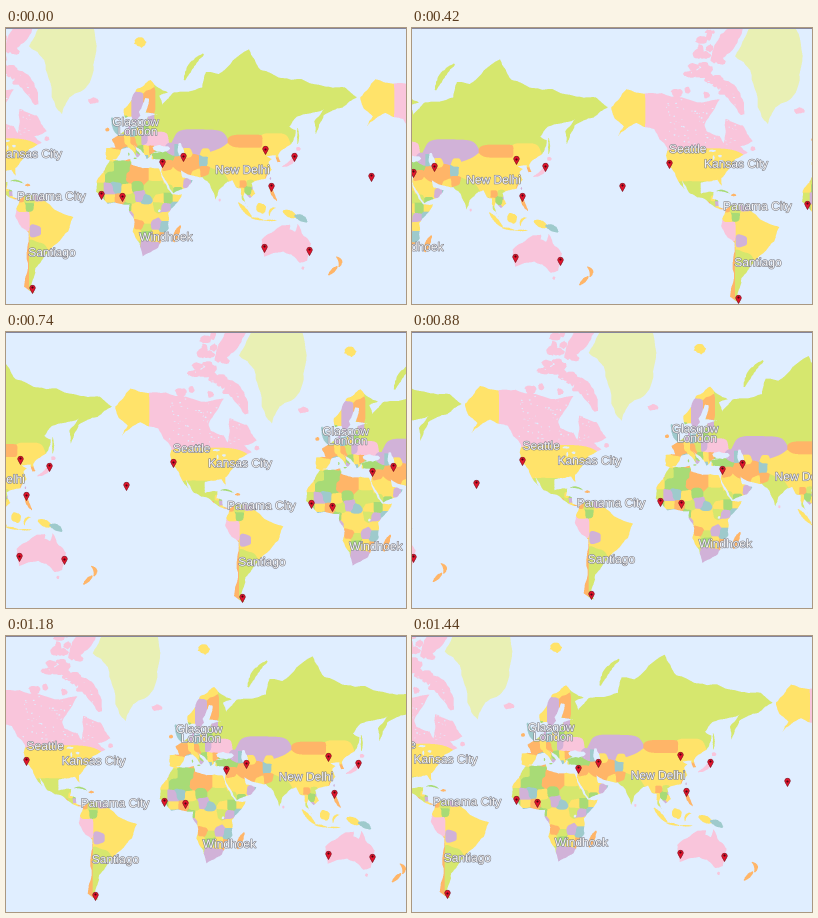
Write a matplotlib script that moves like this. It is 400 px wide and 276 px high and loops after 1460 ms.

```python
import math
import random

import numpy as np
import matplotlib.pyplot as plt
from matplotlib import patheffects
from matplotlib.animation import FuncAnimation
from matplotlib.path import Path

random.seed(4)

WIDTH, HEIGHT = 400, 276
FRAMES, INTERVAL = 73, 20
WORLD = 455                      # width of one whole turn of the map
RADIUS = WORLD / (2 * math.pi)
EQUATOR, WEST, TOP, ROWS = 181.5, -170, -14, 300
LEFT = 111.6 + WEST * WORLD / 360
SS = 3                           # supersampling of the map

COLOURS = {
    "ocean": (224, 238, 255), "lime": (214, 231, 110), "yellow": (255, 227, 106),
    "orange": (255, 181, 104), "pink": (249, 197, 219), "purple": (209, 178, 216),
    "teal": (158, 202, 204), "green": (168, 219, 118), "pale": (233, 240, 180),
    "rim": (133, 133, 154),
}
PATCHES = ["yellow", "purple", "orange", "green", "teal", "lime", "yellow"]


def project(lon, lat):
    """Mercator position in stage pixels, x counted from the map's west edge."""
    lat = np.radians(lat)
    x = (np.asarray(lon) - WEST) * WORLD / 360
    return x, EQUATOR - RADIUS * np.log(np.tan(math.pi / 4 + lat / 2))


def roughen(pts, rounds, amount=0.08):
    """Split every edge and push the new point a little sideways."""
    for _ in range(rounds):
        out = []
        for a, b in zip(pts, np.roll(pts, -1, axis=0)):
            dx, dy = b - a
            push = random.uniform(-amount, amount)
            out += [a, (a + b) / 2 + (-dy * push, dx * push)]
        pts = np.array(out)
    return pts


world = np.empty((ROWS * SS, WORLD * SS, 3), np.uint8)
world[:] = COLOURS["ocean"]
countries = []                   # centre x, y, half width, half height, colour


def distance(place, x, y):
    """1 on the rim of a country's rounded box, less inside it."""
    cx, cy, rx, ry, _ = place
    return ((x - cx) / rx) ** 4 + ((y - cy) / ry) ** 4


def country(colour, west, south, east, north):
    (x0, x1), (y0, y1) = project([west, east], np.array([north, south]))
    countries.append(((x0 + x1) / 2, (y0 + y1) / 2, (x1 - x0) / 2, (y1 - y0) / 2,
                      COLOURS[colour]))


def patchwork(west, south, east, north, step):
    """Small countries on a jittered grid, wherever no large one lies."""
    large = list(countries)
    for i, lon in enumerate(np.arange(west, east, step)):
        for j, lat in enumerate(np.arange(south, north, step)):
            u = lon + random.uniform(-0.25, 0.25) * step
            v = lat + random.uniform(-0.25, 0.25) * step
            x, y = project(u, v)
            if all(distance(c, x, y) > 1 for c in large):
                half = step / 2
                country(PATCHES[(3 * i + 2 * j) % 7], u - half, v - half, u + half, v + half)


def owners(x, y):
    d = np.array([distance(c, x, y) for c in countries])
    return np.array([c[4] for c in countries])[d.argmin(0)]


def paint(colour, pts):
    """Fill a shape; without a colour each point gets that of its country."""
    grid = (pts - (0, TOP)) * SS
    c0, r0 = np.maximum(np.floor(grid.min(0)).astype(int), 0)
    c1, r1 = np.maximum(np.ceil(grid.max(0)).astype(int) + 1, 0)
    block = world[r0:r1, c0:c1]
    if block.size == 0:
        return
    rows, cols = np.mgrid[0:block.shape[0], 0:block.shape[1]]
    x = (cols.ravel() + c0 + 0.5) / SS
    y = (rows.ravel() + r0 + 0.5) / SS + TOP
    inside = Path(pts).contains_points(np.column_stack([x, y]))
    fill = COLOURS[colour] if colour else owners(x[inside], y[inside])
    block[inside.reshape(rows.shape)] = fill


def land(colour, *flat):
    paint(colour, roughen(np.column_stack(project(flat[::2], flat[1::2])), 3))


def blob(colour, lon, lat, w, h):
    """Round island or lake with half sizes in pixels."""
    x, y = project(lon, lat)
    turn = np.arange(9) * 2 * math.pi / 9
    size = np.array([random.uniform(0.8, 1.2) for _ in turn])
    pts = np.column_stack([x + w * size * np.cos(turn), y + h * size * np.sin(turn)])
    paint(colour, roughen(pts, 1, 0.2))


def arc(colour, start, bend, end, width):
    """Long island along a curve, thinner at both ends."""
    a, b, c = (np.array(project(*p)) for p in (start, bend, end))
    t = np.linspace(0, 1, 9)[:, None]
    mid = (1 - t) ** 2 * a + 2 * t * (1 - t) * b + t ** 2 * c
    way = (1 - t) * (b - a) + t * (c - b)
    side = way[:, ::-1] * (-1, 1) / np.linalg.norm(way, axis=1)[:, None]
    side = side * width * (0.25 + 0.75 * np.sin(math.pi * t))
    paint(colour, roughen(np.vstack([mid + side, (mid - side)[::-1]]), 1, 0.15))


# Large countries as rough boxes: west, south, east, north
country("lime", 30, 50, 190, 78)
country("yellow", 75, 22, 122, 46)
country("yellow", 112, 38, 135, 52)
country("purple", 47, 42, 86, 54)
country("orange", 88, 43, 118, 51)
country("lime", 69, 9, 88, 31)
country("orange", 45, 26, 62, 39)
country("yellow", 37, 17, 54, 31)
country("green", 26, 36, 44, 42)
country("purple", 11, 56, 20, 68)
country("yellow", 4, 58, 11, 66)
country("yellow", 12, 67.5, 29, 71.5)
country("orange", 21, 60, 30, 69.5)
country("yellow", -9, 36, 2, 43)
country("orange", -4, 43, 7, 50)
country("pink", 23, 45, 39, 52)
country("green", -3, 20, 9, 37)
country("orange", 10, 21, 24, 33)
country("yellow", 25, 22, 35, 32)
country("lime", 23, 10, 36, 22)
country("yellow", 15, -11, 30, 4)
country("purple", 17, -34, 32, -25)
country("yellow", -168, 55, -141, 71)
country("pink", -141, 49, -55, 72)
country("yellow", -124, 29, -70, 49)
country("lime", -117, 15, -87, 29)
country("yellow", -68, -28, -36, 4)
country("lime", -70, -54, -56, -23)
country("orange", -76, -55, -70, -18)
country("purple", -69, -22, -58, -11)
country("pink", -81, -17, -70, -2)
patchwork(-14, -28, 52, 36, 7.5)
patchwork(-8, 38, 30, 59, 5)
patchwork(40, 14, 76, 43, 7)
patchwork(93, 3, 130, 42, 5.5)
patchwork(-92, 8, -80, 17, 4)
patchwork(-77, 2, -50, 12, 7)
patchwork(-58, -34, -52, -20, 6)

# Mainlands
land(None, -6, 36, 10, 37, 11, 33.5, 20, 31, 32.5, 31, 34, 28.5, 37, 21, 43, 12, 51, 12, 40, -3,
     40.5, -15, 35, -21, 32, -29, 20, -34.8, 12, -17, 13.5, -10, 9, -1, 9.5, 4, -8, 4.5,
     -17, 14, -16.5, 22, -10, 30)
land(None, -6, 36, -9, 37, -9, 43.5, -1.5, 44, -4.5, 48.4, 4, 52, 8.5, 54, 9, 57.5, 11, 54,
     21, 55, 24, 59, 30, 60, 50, 58, 48, 42, 41, 41.5, 28, 41, 23, 37, 19.5, 41.5, 13, 45.5,
     18, 40, 16, 38, 9, 44, 3, 43, -1, 37)
land(None, 30, 60, 22, 60.5, 25, 65.5, 22, 65.8, 17, 61, 18, 59.5, 14, 55.5, 11, 59, 6, 58.5,
     5, 62, 15, 68.5, 26, 71, 40, 67.5, 33, 66.5, 40, 60)
land(None, 35, 58, 36, 64, 44, 67.5, 67, 69, 70, 73, 80, 72.5, 104, 77.5, 113, 73.5, 130, 71.5,
     160, 69.7, 180, 69, 189.5, 66, 178, 62.5, 163, 59.5, 157, 51, 155.7, 57, 163, 61.8,
     142, 59, 136, 54.7, 141, 53, 139, 47.5, 131, 43, 100, 45, 45, 45)
land(None, 45, 55, 125, 55, 131, 43, 127, 39.5, 129, 35.5, 126.5, 35, 125, 39.5, 118, 39, 122, 37,
     119.5, 35, 122, 30, 117, 23.5, 106, 20.5, 109, 12.5, 105, 9, 100.5, 13.4, 99.5, 9.5,
     103.5, 1.5, 98.5, 8, 97.5, 16.5, 94, 17, 91, 22.5, 87, 21.4, 80, 15, 77.5, 8, 72.8, 20,
     67, 24.8, 57, 26.5, 50, 30, 45, 32, 45, 45)
land(None, 50, 30, 51.5, 24.5, 59.5, 22.5, 55, 17, 44, 12.8, 39, 21, 34.5, 28.5, 36, 36.5,
     27, 37, 27, 40.5, 35, 42, 42, 41.5, 49, 42, 55, 34)
land(None, -168, 66, -156, 71.2, -128, 70.2, -96, 67.5, -82, 68.5, -94, 60, -92.5, 57, -82, 55,
     -79, 51.5, -77.5, 62, -64, 59.5, -56, 52.5, -66, 50, -60, 46.5, -70, 43, -76, 36, -81, 31,
     -80.3, 25.5, -84, 30, -97, 28, -97, 20, -87, 21.3, -88, 16, -83.5, 15, -83, 10, -77.5, 8.3,
     -82, 8, -94, 16, -105.5, 20, -112, 29.5, -109.7, 23, -117, 32.5, -124, 41, -123.5, 49,
     -134, 58, -148, 60.5, -163, 54.7, -158, 59, -165, 62)
land(None, -77.5, 8, -72, 12, -62, 10.5, -50, 0, -35, -6, -39, -17, -48, -26, -58, -35, -65, -42,
     -69, -52, -65.5, -55, -74, -52, -71.5, -30, -70.3, -18, -76, -14, -81, -5, -80, 1)
land("pink", 114, -23, 122, -18, 130, -12.5, 136.5, -12, 136, -15.5, 140.5, -17.5, 142.5, -11,
     146, -19, 153, -26, 150, -37.5, 144, -38.7, 137.5, -33.5, 131, -31.5, 116, -35)

# Arctic islands
for _ in range(34):
    north = random.random()
    blob("pink", random.uniform(-119 + 24 * north, -78), 69.5 + 12 * north,
         random.uniform(3, 7), random.uniform(2, 5))
arc("pink", (-88, 73), (-70, 72), (-64, 63.5), 7)
arc("pink", (-88, 77), (-77, 80), (-64, 82.5), 9)
land("pale", -70, 78, -58, 75.5, -52, 66, -44, 60, -38, 66, -22, 70.3, -18, 80, -30, 83.5, -58, 82)
blob("pink", -18.7, 64.9, 6, 3.2)
blob("yellow", 18, 78.7, 6, 5)
arc("lime", (53, 71), (56, 74.5), (68, 76.7), 3)
# Atlantic and Mediterranean islands
blob("pink", -56, 48.6, 2.8, 2.3)
arc("teal", (0.5, 51), (-1.5, 53), (-4.5, 58.7), 2.6)
blob("orange", -8, 53.3, 2, 1.9)
blob("green", 9, 40, 0.8, 1.6)
blob("green", 14, 37.5, 1.6, 0.8)
arc("green", (-84.5, 22), (-80, 23.2), (-74.5, 20.2), 0.9)
blob("orange", -71, 19, 2.6, 1.1)
# Islands of the Indian Ocean and the Pacific
arc("orange", (44.8, -25), (45.5, -20), (49.8, -12.5), 2.6)
blob("pink", 80.8, 7.5, 1, 1.4)
arc("lime", (142.5, 46), (143.5, 50), (142.3, 54), 1)
arc("pink", (130.5, 32), (140, 34.5), (141, 41), 2)
blob("pink", 143, 43.3, 2.4, 2)
blob("purple", 121, 23.7, 0.7, 1.4)
arc("orange", (121, 18.5), (121.5, 13), (126, 7), 1.8)
arc("yellow", (95.5, 5.5), (101, -1), (106, -6), 2.2)
arc("yellow", (105.5, -6.7), (110, -7), (115.5, -8.5), 1.1)
arc("yellow", (116, -8.6), (121, -8.6), (126, -8.6), 0.7)
blob("yellow", 113.7, 1, 5.2, 5.2)
arc("yellow", (120, -5), (120, 1), (125, 1.3), 1.2)
arc("yellow", (131, -1), (136, -3.5), (142, -6), 3.6)
arc("teal", (140, -5), (146, -6), (150, -10), 3.2)
blob("pink", 146.6, -42, 1.6, 1.5)
arc("orange", (166.8, -46), (171, -43), (174, -41), 2)
arc("orange", (173, -35), (178.5, -37.5), (175, -41.3), 2)
# Inland seas and lakes
blob("ocean", 34.5, 43.3, 8, 3.2)
arc("ocean", (49, 46.5), (50, 41), (52, 37), 3)
blob("ocean", 33, -1, 1.4, 1.4)
blob("ocean", -88, 47.7, 3.8, 1.2)
blob("ocean", -87, 44, 1, 2.4)
blob("ocean", -82, 44.8, 1.8, 1.6)
blob("ocean", -81, 42.2, 2.4, 0.7)
for _ in range(110):
    blob("ocean", random.uniform(-126, -68), random.uniform(51, 76),
         random.uniform(0.3, 1.2), random.uniform(0.2, 0.8))

LABELS = {
    "Seattle": (-122.3, 47.6), "Kansas City": (-94.6, 39.1), "Panama City": (-79.5, 9),
    "Santiago": (-70.7, -33.4), "Glasgow": (-4.25, 55.9), "London": (-0.1, 51.5),
    "Windhoek": (17.1, -22.6), "New Delhi": (77.2, 28.6),
}
PINS = [(116.4, 39.9), (139.7, 35.7), (121, 14.6), (115.9, -31.9), (151.2, -33.9), (-159.5, 22),
        (-122.4, 37.8), (-68, -54.8), (-13.2, 8.5), (3.4, 6.5), (35.2, 31.8), (51.4, 35.7)]

# Pan of the map, as it is dragged about
STOPS = [0, 11, 21, 37, 51, 59, 72]
PAN_X = [0, -96, -155, -245, -358, -391.5, -445.5]
PAN_Y = [0, 5.4, 10, 5.4, 0.2, -1, -2.5]

fig = plt.figure(figsize=(WIDTH / 72, HEIGHT / 72), dpi=72)
ax = fig.add_axes([0, 0, 1, 1])
ax.axis("off")
picture = ax.imshow(np.zeros((HEIGHT, WIDTH, 3), np.uint8), extent=(0, WIDTH, HEIGHT, 0),
                    interpolation="nearest", aspect="auto")
ax.set_xlim(0, WIDTH)
ax.set_ylim(HEIGHT, 0)

HEAD, HEAD_R = 5.6, 2.7
turn = np.radians(np.linspace(-25, 205, 24))
drop = np.column_stack([HEAD_R * np.cos(turn), HEAD + HEAD_R * np.sin(turn)])
drop = Path(np.vstack([[0, 0], drop, [0, 0]]), closed=True)
bodies, = ax.plot([], [], ls="", marker=drop, ms=2 * np.abs(drop.vertices).max(),
                  mfc="#e3132c", mec="#7d0a18", mew=0.6, zorder=4)
dots, = ax.plot([], [], ls="", marker="o", ms=2.1, mfc="#4a0610", mec="none", zorder=5)
pin_x, pin_y = project(*np.array(PINS).T)

outline = [patheffects.Stroke(linewidth=1.1, foreground="#7c7c84"), patheffects.Normal()]
texts = []
for name, place in LABELS.items():
    x, y = project(*place)
    for copy in (0, -WORLD):
        text = ax.text(0, 0, name, family="Liberation Sans", size=12, color="#f4f4f6",
                       va="baseline", path_effects=outline, clip_on=True, zorder=6)
        texts.append((text, x, y, copy))


def view(dx, dy):
    """The visible part of the map, averaged down to stage pixels."""
    top = round((-dy - TOP) * SS)
    cols = (np.arange(WIDTH * SS) - round((LEFT + dx) * SS)) % (WORLD * SS)
    part = world[top:top + HEIGHT * SS][:, cols]
    part = part.reshape(HEIGHT, SS, WIDTH, SS, 3).mean((1, 3)).astype(np.uint8)
    part[0] = COLOURS["rim"]
    return part


def update(i):
    dx, dy = np.interp(i, STOPS, PAN_X), np.interp(i, STOPS, PAN_Y)
    picture.set_data(view(dx, dy))
    x = (pin_x + LEFT + dx) % WORLD
    x = np.concatenate([x, x - WORLD])
    y = np.tile(pin_y + dy, 2)
    bodies.set_data(x, y)
    dots.set_data(x, y - HEAD)
    for text, tx, ty, copy in texts:
        text.set_position(((tx + LEFT + dx) % WORLD + copy, ty + dy + 2))
    return [picture, bodies, dots] + [t[0] for t in texts]


anim = FuncAnimation(fig, update, frames=FRAMES, interval=INTERVAL, repeat=True)
plt.show()
```
